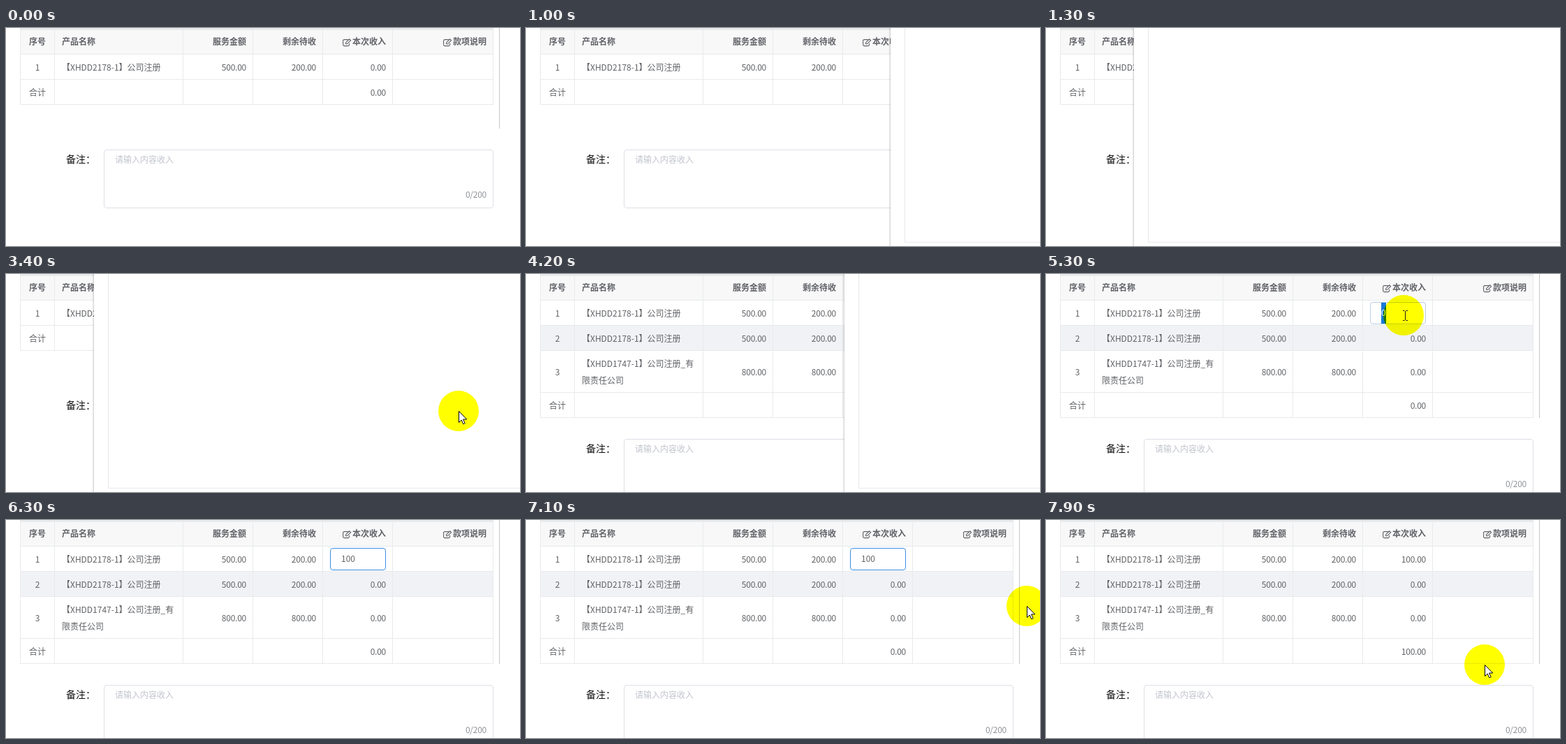
An HTML page for the animation above (8 s loop, 736 px wide and 312 px high).

```html
<!DOCTYPE html>
<html lang="zh-CN">
<head>
<meta charset="utf-8">
<title>收入明细</title>
<style>
html, body { margin: 0; width: 100%; height: 100%; overflow: hidden; background: #fff; }
svg { display: block; width: 736px; height: 312px; isolation: isolate; }
text {
  font: 12px "Noto Sans CJK SC", "Noto Sans CJK", sans-serif;
  fill: #606266; white-space: pre; text-spacing-trim: space-all;
}
.head { font-weight: 700; }
.num { text-anchor: end; letter-spacing: -.25px; }
.right { text-anchor: end; }
.mid { text-anchor: middle; }
.label { font-size: 14px; fill: #111; }
.hint { fill: #c0c4cc; }
.count { fill: #909399; }
.picked { fill: #fff; }
.halo { fill: #ff0; mix-blend-mode: multiply; }
.drawer { filter: drop-shadow(-1px 0 1px rgba(0, 0, 0, .22)); }
</style>
</head>
<body>
<svg id="stage" viewBox="0 0 736 312"></svg>
<script>
const LOOP = 8000;
const LINE = '#e8eaec';
const COLS = [20, 69, 253, 353, 453, 553, 697];
const stage = document.getElementById('stage');

function add(parent, tag, attrs = {}, content = '') {
  const el = document.createElementNS('http://www.w3.org/2000/svg', tag);
  for (const name in attrs) el.setAttribute(name, attrs[name]);
  el.textContent = content;
  parent.append(el);
  return el;
}
const group = (parent = stage) => add(parent, 'g');
const rect = (parent, x, y, width, height, fill, more) =>
  add(parent, 'rect', { x, y, width, height, fill, ...more });
// y is the middle of the line of text
const text = (parent, x, y, content, cls = '') =>
  add(parent, 'text', { x, y: y + (cls === 'label' ? 5 : 4), class: cls }, content);
const frame = (parent, x, y, w, h, stroke) =>
  rect(parent, x + .5, y + .5, w - 1, h - 1, '#fff', { rx: 3.5, stroke });

// keys: [time, style, number of steps to the next key]
function track(el, keys) {
  const frames = keys.map(([t, style, n = 1]) =>
    ({ ...style, offset: t / LOOP, easing: `steps(${n}, end)` }));
  if (keys[0][0] > 0) frames.unshift({ ...frames[0], offset: 0, easing: 'steps(1, end)' });
  frames.push({ ...keys[keys.length - 1][1], offset: 1 });
  el.animate(frames, { duration: LOOP, iterations: Infinity });
}
function show(el, from, to = LOOP) {
  const keys = [[0, { opacity: from > 0 ? 0 : 1 }]];
  if (from > 0) keys.push([from, { opacity: 1 }]);
  if (to < LOOP) keys.push([to, { opacity: 0 }]);
  track(el, keys);
  return el;
}

function editIcon(parent, x, y) {
  const g = add(parent, 'g', { transform: `translate(${x} ${y})`, fill: 'none', stroke: '#606266' });
  add(g, 'path', { d: 'M8.3 1.6H2.4Q.6 1.6 .6 3.4V8.800Q.6 10.600 2.400 10.600H7.800Q9.600 10.600 9.600 8.800V7', 'stroke-width': 1.1 });
  add(g, 'path', { d: 'M4.600 7.800V5.900L9.700 .8L11.600 2.700L6.500 7.800Z', 'stroke-width': 1.1 });
}

function header(parent) {
  rect(parent, 20, 0, 678, 38, '#f8f8f9');
  rect(parent, 20, 0, 678, 3, LINE);
  text(parent, 45, 20, '序号', 'head mid');
  text(parent, 80, 20, '产品名称', 'head');
  [[344, '服务金额'], [444, '剩余待收'], [544, '本次收入'], [688, '款项说明']]
    .forEach(([x, s]) => text(parent, x, 20, s, 'head right'));
  editIcon(parent, 482, 15);
  editIcon(parent, 626, 15);
}

function row(parent, y, no, name, amount, rest) {
  text(parent, 45, y, no, 'mid');
  name.forEach((s, i) => text(parent, 80, y + i * 24 - (name.length - 1) * 12, s));
  text(parent, 344, y, amount, 'num');
  text(parent, 444, y, rest, 'num');
}

function grid(parent, ys) {
  const bottom = ys[ys.length - 1];
  ys.forEach(y => rect(parent, 20, y, 678, 1, LINE));
  COLS.forEach(x => rect(parent, x, 0, 1, bottom, LINE));
}

function note(parent, y) {
  text(parent, 86, y + 14, '备注：', 'label');
  frame(parent, 140, y, 558, 84, '#dcdfe6');
  text(parent, 156, y + 15, '请输入内容收入', 'hint');
  text(parent, 688, y + 65, '0/200', 'num count');
}

rect(stage, 0, 0, 736, 312, '#fff');

const product = ['【XHDD2178-1】公司注册'];

// one product
const before = show(group(), 0, 4200);
header(before);
grid(before, [37, 73, 109]);
row(before, 57, '1', product, '500.00', '200.00');
text(before, 544, 57, '0.00', 'num');
text(before, 45, 93, '合计', 'mid');
text(before, 544, 93, '0.00', 'num');
rect(before, 706, 0, 1, 144, '#c8c8c8');
note(before, 174);

// three products
const after = show(group(), 4200);
header(after);
rect(after, 20, 74, 678, 35, '#f0f2f5');
grid(after, [37, 73, 109, 169, 205]);
row(after, 57, '1', product, '500.00', '200.00');
row(after, 93, '2', product, '500.00', '200.00');
row(after, 141, '3', ['【XHDD1747-1】公司注册_有', '限责任公司'], '800.00', '800.00');
text(after, 544, 93, '0.00', 'num');
text(after, 544, 141, '0.00', 'num');
text(after, 45, 189, '合计', 'mid');
for (const y of [57, 189]) {
  show(text(after, 544, y, '0.00', 'num'), 0, 7300);
  show(text(after, 544, y, '100.00', 'num'), 7300);
}
rect(after, 706, 0, 1, 206, '#c8c8c8');
note(after, 236);

// cell editor
const editor = show(group(), 5200, 7300);
show(frame(editor, 464, 40, 80, 32, '#b9cde3'), 5200, 5400);
show(frame(editor, 464, 40, 80, 32, '#3a8ee6'), 5400);
const picked = show(group(editor), 5200, 5900);
rect(picked, 480, 41, 7, 30, '#1a78d6');
text(picked, 480, 56, '0', 'picked');
[['1', 5900, 6100], ['10', 6100, 6300], ['100', 6300, LOOP]]
  .forEach(([s, from, to]) => show(text(editor, 480, 56, s), from, to));

// side drawer
const drawer = add(stage, 'g', { class: 'drawer' });
rect(drawer, 126, -10, 640, 332, '#fff');
rect(drawer, 146, 0, 1, 307, '#e6e8ec');
rect(drawer, 146, 306, 620, 1, '#e6e8ec');
track(drawer, [[0, 640], [1000, 396], [1100, 134], [1200, 24], [1300, 0], [4200, 330], [4300, 640]]
  .map(([t, x]) => [t, { transform: `translate(${x}px, 0px)` }]));

// pointer: [time, x, y, shape, steps]
const OFF = 0, ARROW = 1, BEAM = 2;
const path = [
  [0, 648, 196, OFF],
  [3400, 648, 196, ARROW],
  [3500, 626, 224, OFF],
  [4500, 626, 224, ARROW, 2],
  [4700, 455, 87, ARROW, 3],
  [5000, 505, 48, ARROW, 2],
  [5200, 511, 56, BEAM],
  [5300, 512, 59, BEAM],
  [5400, 515, 66, BEAM],
  [5500, 515, 66, OFF],
  [6500, 515, 66, BEAM],
  [6600, 540, 67, ARROW],
  [6700, 562, 68, ARROW],
  [6800, 717, 123, OFF],
  [7100, 717, 123, ARROW, 8],
  [7900, 628, 207, ARROW]
];
function follow(el, ...shapes) {
  track(el, path.map(([t, x, y, , n]) => [t, { transform: `translate(${x}px, ${y}px)` }, n]));
  track(el, path.map(([t, , , shape]) => [t, { opacity: shapes.includes(shape) ? 1 : 0 }]));
}
follow(add(stage, 'circle', { r: 29, class: 'halo' }), ARROW, BEAM);
follow(add(stage, 'path', {
  d: 'M.5 .5V16.500L4.200 13L6.800 18.800L9.200 17.700L6.600 12H11.700Z', fill: '#fff', stroke: '#000'
}), ARROW);
follow(add(stage, 'path', {
  d: 'M-1 -6.500H1.500M3.500 -6.500H6M2.500 -6V7M-1 7.500H1.500M3.500 7.500H6', fill: 'none', stroke: '#222'
}), BEAM);
</script>
</body>
</html>
```
